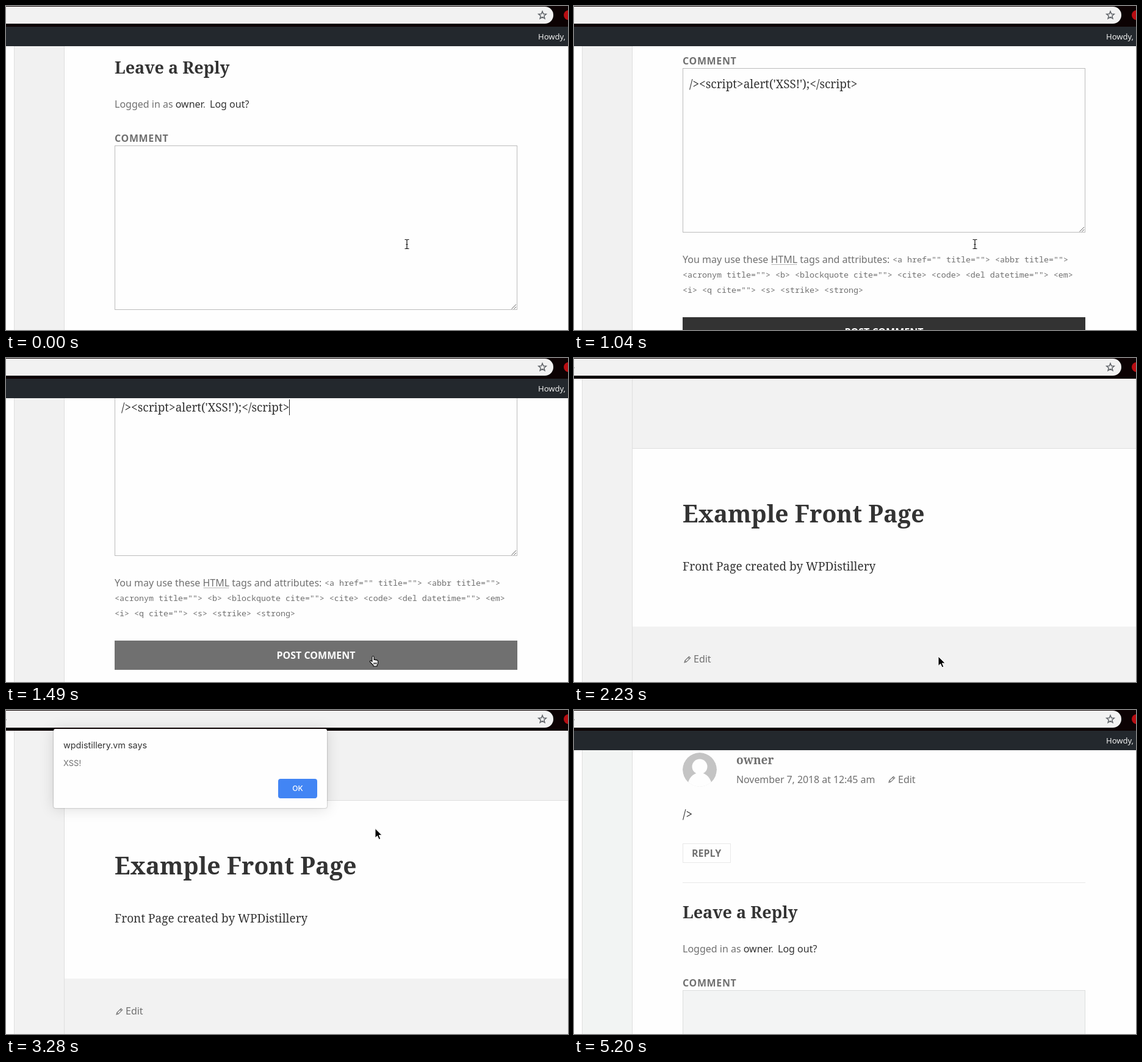
Recreate the animation shown at these times as an HTML page. Size 921 by 532 pixels, loop 5.73 s.

```html
<!DOCTYPE html>
<html lang="en">
<head>
<meta charset="utf-8">
<title>Comment form demo</title>
<style>
html, body { margin: 0; width: 100%; height: 100%; overflow: hidden; background: #fefefe; }
#stage { position: relative; width: 921px; height: 532px; overflow: hidden; }
svg { position: absolute; left: 0; top: 0; display: block; }
text { font: 16px "Noto Sans", sans-serif; fill: #707070; white-space: pre; }
.b { font-weight: 700; }
.dark { fill: #333; }
text.serif { font: 19px "Noto Serif", serif; }
text.h2 { font: 700 27px "Noto Serif", serif; }
text.h1 { font: 700 39px "Noto Serif", serif; }
text.code { font: 13.333px "Noto Sans Mono", monospace; }
#dialog {
  position: absolute; left: 78px; top: 31px; width: 448px; height: 130px;
  background: #fefefe; border-radius: 3px; transform-origin: 50% 100%;
  box-shadow: 0 0 2px rgba(0,0,0,.45), 0 1px 24px rgba(0,0,0,.14);
}
#dialog.tilted { transform: translateY(-4px) perspective(1000px) rotateX(8deg) scaleY(1.03); }
#dialog text { font-family: Inter, Roboto, sans-serif; }
</style>
</head>
<body>
<div id="stage">
  <svg width="921" height="532">
    <defs>
      <path id="pencil" d="M1 11L1.9 7.9 8.5 1.3 10.7 3.5 4.1 10.1ZM7 2.8L9.2 5M1.9 7.9L4.1 10.1" fill="none" stroke="#707070" stroke-width="1.1"/>
    </defs>
    <rect width="921" height="532" fill="#fefefe"/>
    <rect id="side" x="14" width="81" height="532"/>

    <g id="post">
      <clipPath id="round"><circle cx="206" cy="-133" r="28"/></clipPath>
      <g clip-path="url(#round)">
        <circle cx="206" cy="-133" r="28" fill="#c4c4c4"/>
        <circle cx="206" cy="-138" r="12.5" fill="#fefefe"/>
        <ellipse cx="206" cy="-105" rx="20" ry="23" fill="#fefefe"/>
      </g>
      <text class="serif b" x="266" y="-142" style="font-weight:700">owner</text>
      <text x="266" y="-111" letter-spacing="-.08">November 7, 2018 at 12:45 am</text>
      <use href="#pencil" x="515" y="-123"/>
      <text x="531" y="-111">Edit</text>
      <text class="serif dark" x="178" y="-53">/&gt;</text>
      <rect x="178.5" y="-11.5" width="78" height="31" fill="none" stroke="#e8e8e8"/>
      <text class="b" x="193" y="10">REPLY</text>
      <rect x="178" y="52" width="660" height="1" fill="#e8e8e8"/>

      <text class="h2 dark" x="178" y="111">Leave a Reply</text>
      <text x="178" y="167">Logged in as <tspan class="dark">owner</tspan>. <tspan class="dark" x="334">Log out?</tspan></text>
      <text class="b" x="178" y="223" letter-spacing=".64">COMMENT</text>
      <rect id="area" x="178.5" y="229.5" width="659" height="269"/>
      <path d="M828.5 497.5l7.5-7.5M832.5 497.5l3.5-3.5" stroke="#666" fill="none"/>
      <text id="typed" class="serif dark" x="189" y="262">/&gt;&lt;script&gt;alert('XSS!');&lt;/script&gt;</text>
      <rect id="caret" x="464" y="242" width="1" height="26" fill="#222"/>

      <text x="178" y="549">You may use these HTML tags and attributes:</text>
      <path d="M324 551.5H366" stroke="#707070" stroke-dasharray="1 1"/>
      <text class="code" x="522" y="548">&lt;a href="" title=""&gt; &lt;abbr title=""&gt;</text>
      <text class="code" x="178" y="573">&lt;acronym title=""&gt; &lt;b&gt; &lt;blockquote cite=""&gt; &lt;cite&gt; &lt;code&gt; &lt;del datetime=""&gt; &lt;em&gt;</text>
      <text class="code" x="178" y="598">&lt;i&gt; &lt;q cite=""&gt; &lt;s&gt; &lt;strike&gt; &lt;strong&gt;</text>
      <rect id="submit" x="178" y="638" width="660" height="48"/>
      <text class="b" x="508" y="668" text-anchor="middle" style="fill:#fefefe">POST COMMENT</text>
    </g>

    <g id="front">
      <rect x="14" width="907" height="532" fill="#f2f2f2"/>
      <rect x="95" y="148" width="826" height="293" fill="#dfdfdf"/>
      <rect x="96" y="149" width="825" height="292" fill="#fefefe"/>
      <text class="h1 dark" x="178" y="270">Example Front Page</text>
      <text class="serif dark" x="178" y="349">Front Page created by WPDistillery</text>
      <use href="#pencil" x="180" y="489"/>
      <text x="196" y="500">Edit</text>
    </g>

    <rect x="13" width="1" height="532" fill="#dfdfdf"/>
    <rect x="95" width="1" height="532" fill="#dfdfdf"/>
    <g id="adminbar">
      <rect y="34" width="921" height="32" fill="#23282d"/>
      <text x="872" y="55" style="font-size:13px;fill:#eee">Howdy,</text>
    </g>
    <rect width="921" height="34" fill="#0c0203"/>
    <rect x="-30" y="1" width="927" height="28" rx="14" fill="#f2f2f2"/>
    <rect id="address" y="15" width="1" height="2" fill="#aaa"/>
    <path id="star" fill="none" stroke="#5f6368" stroke-width="1.5"/>
    <circle cx="922" cy="15" r="8" fill="#b80d12"/>
  </svg>

  <div id="dialog">
    <svg width="448" height="130">
      <text x="16" y="32" style="font-size:14.4px;fill:#333">wpdistillery.vm says</text>
      <text x="16" y="61" style="font-size:13px;fill:#707070">XSS!</text>
      <rect id="ok" x="368" y="82" width="64" height="32" rx="4"/>
      <text x="400" y="102" text-anchor="middle" style="font-size:12px;font-weight:500;fill:#fff">OK</text>
    </svg>
  </div>

  <svg width="921" height="532">
    <g id="cursor">
      <path id="beam" d="M-3.5 -7.5h2q1.5 0 1.5 1.5 0-1.5 1.5-1.5h2M0 -6V6M-3.5 7.5h2q1.5 0 1.5-1.5 0 1.5 1.5 1.5h2M-1.5 .5h3" fill="none" stroke="#111" stroke-width="1.2"/>
      <path id="arrow" d="M0 0V15.5L3.6 12.2 6.2 18 8.8 16.9 6.3 11.2H11.2Z" fill="#000" stroke="#fff" stroke-width="1"/>
      <path id="hand" d="M0 1.5Q0-.5 1.5-.5T3 1.5V5.5Q4.5 4.5 5.5 6 7 5 8 6.5 9.5 6 9.5 8V11Q9.5 13 8 14.5V16H2V14.5L-3.5 9Q-4 7-2 7L0 8.5ZM3 10v3M5 10v3M7 10v3" fill="#fff" stroke="#000" stroke-width="1.1"/>
    </g>
  </svg>
</div>
<script>
const LOOP = 5730;
const $ = id => document.getElementById(id);
const show = (id, on) => $(id).style.display = on ? '' : 'none';

// Each step changes part of the state and holds until the next one.
const steps = [
  [0, { page: 'post', scroll: 0, cursor: ['beam', 657, 391], dialog: 0, ok: '#4285f4',
        area: '#fefefe', border: '#bcbcbc', side: '#f1f1f1' }],
  [150, { typed: true, caret: true }],
  [600, { caret: false }],
  [890, { scroll: 64 }],
  [1040, { scroll: 127 }],
  [1190, { scroll: 174, caret: true }],
  [1340, { cursor: ['beam', 632, 442] }],
  [1490, { cursor: ['hand', 600, 490], hover: true }],
  [1640, { caret: false }],
  [2230, { page: 'front', cursor: ['arrow', 597, 490], visited: true }],
  [2380, { dialog: .8 }],
  [2530, { dialog: 1 }],
  [2830, { cursor: ['arrow', 606, 446] }],
  [2980, { cursor: ['arrow', 610, 335] }],
  [3130, { cursor: ['arrow', 609, 235] }],
  [3280, { cursor: ['arrow', 605, 194.5] }],
  [3880, { cursor: ['arrow', 580, 184] }],
  [4030, { cursor: ['arrow', 515, 147] }],
  [4180, { cursor: ['arrow', 484.5, 128] }],
  [4320, { ok: '#4f7fd9' }],
  [4470, { dialog: .75 }],
  [4620, { dialog: 0, cursor: ['arrow', 600, 255] }],
  [4760, { page: 'post', scroll: -231, typed: false, hover: false, cursor: ['beam', 756, 414],
           area: '#f3f4f4', border: '#dcdedd', side: '#f2f4f3' }],
  [4910, { cursor: ['beam', 818, 473] }],
  [5050, { cursor: ['beam', 832, 508] }],
  [5200, { cursor: ['none', 0, 0] }]
];

function draw() {
  const t = performance.now() % LOOP;
  const s = Object.assign({}, ...steps.filter(([at]) => at <= t).map(step => step[1]));
  const front = s.page === 'front';
  show('front', front);
  show('post', !front);
  show('adminbar', !front);
  show('typed', s.typed);
  show('caret', s.caret);
  show('address', s.visited);
  $('post').setAttribute('transform', `translate(0 ${-s.scroll})`);
  $('side').setAttribute('fill', s.side);
  $('area').setAttribute('fill', s.area);
  $('area').setAttribute('stroke', s.border);
  $('submit').setAttribute('fill', s.hover ? '#707070' : '#333');

  show('dialog', s.dialog);
  $('dialog').style.opacity = s.dialog;
  $('dialog').className = s.dialog < 1 ? 'tilted' : '';
  $('ok').setAttribute('fill', s.ok);

  const [shape, x, y] = s.cursor;
  for (const id of ['beam', 'arrow', 'hand']) show(id, id === shape);
  $('cursor').setAttribute('transform', `translate(${x} ${y})`);
  requestAnimationFrame(draw);
}

const points = Array.from({ length: 10 }, (_, i) => {
  const r = i % 2 ? 2.9 : 6.6, a = i * Math.PI / 5;
  return `${879 + r * Math.sin(a)} ${15.3 - r * Math.cos(a)}`;
});
$('star').setAttribute('d', `M${points.join('L')}Z`);
draw();
</script>
</body>
</html>
```
